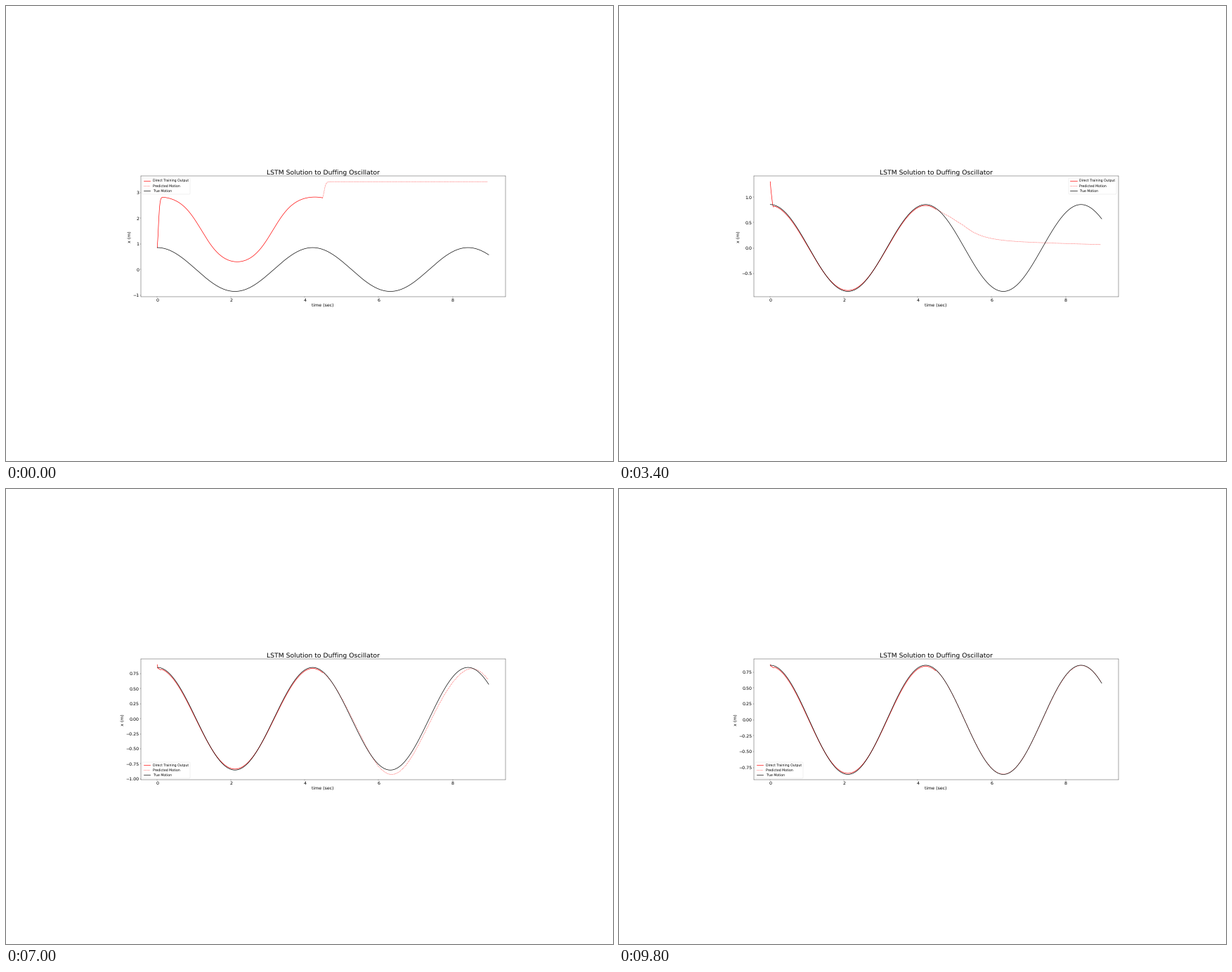
Animation, 864 px wide and 648 px high, one loop 10 s. Source, as a matplotlib script:

```python
import numpy as np
import matplotlib.pyplot as plt
from matplotlib.animation import FuncAnimation

W, H = 864, 648
K = 0.31            # plot points to stage pixels
STEP = 200          # ms per frame
FRAMES = 50
A, PERIOD = 0.856, 4.21

plt.rcParams.update({"font.family": "DejaVu Sans", "text.hinting": "none",
                     "patch.linewidth": 1.0 * K})

t = np.linspace(0, 8.98, 450)
ts = t[:225]        # training span
tp = t[224:449]     # prediction span
u = tp - tp[0]


def true(x):
    return A * np.cos(2 * np.pi * x / PERIOD)


def bump(x, centre, width):
    return np.exp(-((x - centre) / width) ** 2)


def sigmoid(x):
    return 1 / (1 + np.exp(-x))


def first_fit():
    """Saturated, offset response that starts on the true motion."""
    y = 1.399 + 1.798 * np.tanh(1.05 * (true(ts - 0.06) + 0.18))
    return y + (A - y[0]) * np.exp(-(ts / 0.046) ** 1.6)


def fitted(spike, width=0.02, gain=0.98, bow=0.015, lead=0.0, dip=0.015):
    """Nearly true motion with a start-up spike and undershoot."""
    x = true(ts + lead)
    y = gain * x - bow * (1 - (x / A) ** 2)
    return y + spike * np.clip(1 - ts / width, 0, 1) - dip * bump(ts, 0.08, 0.03)


def delayed(lag, gain):
    return gain * true(tp - lag)


def flattened():
    """Follows the motion, then relaxes to a constant."""
    tail = -0.69 + 0.54 * np.exp(-(tp - 5.42) / 0.45)
    mix = sigmoid((tp - 5.25) / 0.06)
    return (1 - mix) * delayed(0.04 * u, 0.98) + mix * tail


rise = 3.43 - 0.63 * np.exp(-(u / 0.06) ** 1.6)
level = 0.45 + 0.3 * np.exp(-u / 0.4)
plunge = -2.99 + 3.71 * sigmoid((0.07 - u) / 0.015) - 0.51 * bump(u, 0.14, 0.06)
sag = flattened()
drift = 0.675 - 0.0345 * u + 0.09 * np.exp(-u / 0.3)
swing = delayed(0.22 * bump(tp, 5.3, 0.45) - 0.06 * bump(tp, 6.25, 0.3)
                + 0.28 * bump(tp, 8.0, 0.9), 0.98 - 0.008 * u ** 2)
over = delayed(0.027 * u, 0.975 + 0.14 * bump(u, 1.8, 1))
late = delayed(0.05 * bump(tp, 5.7, 0.5) + 0.13 * bump(tp, 8.2, 0.5), 0.97)
early = delayed(-0.01 * u, 0.975 + 0.12 * bump(u, 1.8, 1))
near = delayed(0.007 * u, 0.98)
match = delayed(0.002 * u, 0.993)

# (time in ms, training output, prediction)
poses = [
    (0, first_fit(), rise),
    (800, fitted(0.08, 0.05, gain=0.9), level),
    (1400, fitted(2.95, 0.07, gain=0.95, bow=0.02, lead=0.04, dip=0.14), plunge),
    (2400, fitted(1.1, 0.07, gain=0.975, lead=0.005, dip=0.03), sag),
    (4000, fitted(0.09), drift),
    (4600, fitted(-0.04), drift),
    (6000, fitted(0.083), swing),
    (6800, fitted(0.08), over),
    (7800, fitted(-0.01), late),
    (8200, fitted(0.08), early),
    (8600, fitted(0.02), near),
    (9800, fitted(0.025), match),
]
keys = [pose[0] for pose in poses]


def curves(frame):
    now = frame * STEP
    i = min(np.searchsorted(keys, now, side="right") - 1, len(keys) - 2)
    (k0, fit0, pred0), (k1, fit1, pred1) = poses[i], poses[i + 1]
    s = (now - k0) / (k1 - k0)
    return fit0 + s * (fit1 - fit0), pred0 + s * (pred1 - pred0)


fig = plt.figure(figsize=(12, 9), dpi=72, facecolor="white")
left, right, top, bottom = 191.7, 710.64, 242.42, 414.29
ax = fig.add_axes([left / W, 1 - bottom / H,
                   (right - left) / W, (bottom - top) / H])
for spine in ax.spines.values():
    spine.set_linewidth(0.35)
ax.tick_params(labelsize=20 * K, length=3.5 * K, width=0.35, pad=3.5 * K)
ax.set_title("LSTM Solution to Duffing Oscillator", fontsize=30 * K, pad=6 * K)
ax.set_xlabel("time (sec)", fontsize=20 * K, labelpad=4 * K)
ax.set_ylabel("x (m)", fontsize=20 * K, labelpad=4 * K)

LW = 0.68
fit_line, = ax.plot(ts, ts, "r-", lw=LW, label="Direct Training Output")
pred_line, = ax.plot(tp, tp, "r:", lw=LW, label="Predicted Motion")
ax.plot(t, true(t), "k-", lw=LW, label="True Motion")
ax.set_xlim(-0.05 * t[-1], 1.05 * t[-1])
ax.legend(loc="best", fontsize=15 * K)


def draw(frame):
    fit, pred = curves(frame)
    fit_line.set_ydata(fit)
    pred_line.set_ydata(pred)
    lo = min(-A, fit.min(), pred.min())
    hi = max(A, fit.max(), pred.max())
    pad = 0.05 * (hi - lo)
    ax.set_ylim(lo - pad, hi + pad)
    return fit_line, pred_line


anim = FuncAnimation(fig, draw, frames=FRAMES, interval=STEP,
                     repeat=True, repeat_delay=0, blit=False)
plt.show()
```
